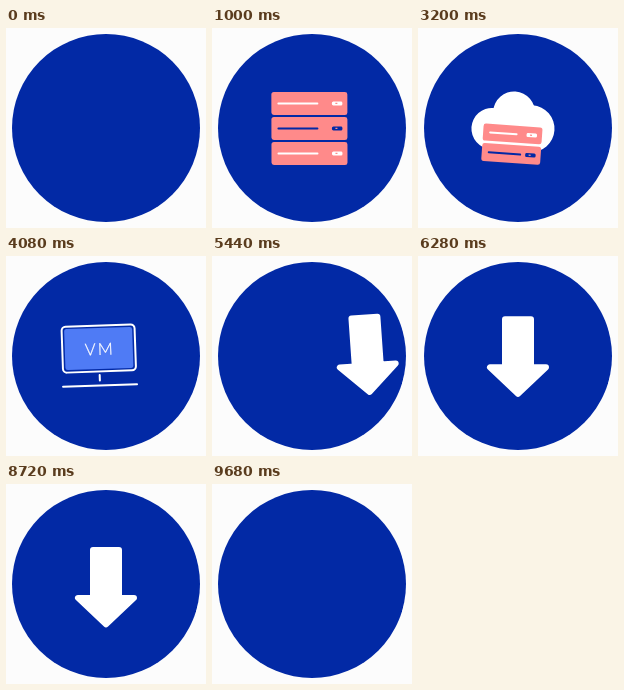
An HTML page for the animation above (10 s loop, 200 px wide and 200 px high).

```html
<!DOCTYPE html>
<html lang="en">
<head>
<meta charset="utf-8">
<title>Cloud icons</title>
<style>
  html, body { margin: 0; width: 100%; height: 100%; overflow: hidden; background: #fcfcfc; }
  svg { display: block; width: 100vw; height: 100vh; }
  .line { fill: none; stroke: #fff; stroke-width: 2; stroke-linecap: round; stroke-linejoin: round; }
  .label { font: 300 16.5px Lato, "Open Sans", sans-serif; fill: #fff; stroke: #fff; stroke-width: .3; }
</style>
</head>
<body>
<svg viewBox="0 0 200 200">
  <defs>
    <clipPath id="disc"><circle cx="98" cy="100" r="92"/></clipPath>
  </defs>
  <circle cx="100" cy="100" r="94" fill="#0229a5"/>
  <g clip-path="url(#disc)">
    <g class="item" id="rack"></g>
    <g class="item" id="cloud">
      <g fill="#fff">
        <circle cx="-21" cy="2" r="20.5"/>
        <circle cx="0" cy="-15.5" r="21"/>
        <circle cx="18" cy="-.5" r="23.5"/>
        <rect x="-21" y="0" width="40" height="22.8"/>
      </g>
    </g>
    <g class="item" id="screen">
      <rect class="line" x="-36.5" y="-30" width="73" height="46" rx="4"/>
      <rect x="-34" y="-27.5" width="68" height="41" rx="2.5" fill="#4f7bf5"/>
      <text class="label" x="-14" y="-.5">V</text>
      <text class="label" x="-1" y="-.5">M</text>
      <path class="line" d="M0 19.5V25M-37 30H37"/>
    </g>
    <g class="item" id="arrow">
      <path d="M-13 -37H13V11H28L0 37.5L-28 11H-13Z" fill="#fff" stroke="#fff"
            stroke-width="6" stroke-linejoin="round"/>
    </g>
  </g>
</svg>
<script>
const LOOP = 10000;
const NAVY = '#0229a5', WHITE = '#fff', SALMON = '#ff8a8a';
const NS = 'http://www.w3.org/2000/svg';
const $ = id => document.getElementById(id);

function add(parent, tag, attrs) {
  const el = document.createElementNS(NS, tag);
  for (const key in attrs) el.setAttribute(key, attrs[key]);
  parent.appendChild(el);
}

function addServer(parent, y, w, h, ink, reach) {
  const mid = y + h / 2, left = -w / 2;
  add(parent, 'rect', { x: left, y, width: w, height: h, rx: 2.5, fill: SALMON });
  add(parent, 'path', {
    d: `M${left + 7} ${mid}H${reach}`,
    stroke: ink, 'stroke-width': 2, 'stroke-linecap': 'round'
  });
  add(parent, 'rect', { x: -left - 15.5, y: mid - 2, width: 10.5, height: 4, rx: 1.5, fill: ink });
  add(parent, 'rect', { x: -left - 12, y: mid - .6, width: 2, height: 1.2, fill: SALMON });
}

addServer($('cloud'), -2.5, 59, 17, WHITE, 4);
addServer($('cloud'), 17, 59, 18, NAVY, 9);
for (const [y, ink] of [[-36, WHITE], [-11, NAVY], [14, WHITE]])
  addServer($('rack'), y, 76, 23, ink, 8);

// Rows: time, x, y, turn
const ENTER = [
  [0, 140, -2, -5], [240, 55, -1.5, -4], [420, 12, -1, -3.2],
  [600, -7, -.5, -2], [760, -13, 0, -1], [1040, 0, 0, 0]
];
const LEAVE = [
  [0, 0, 0, 0], [300, 0, 0, 3.2], [360, -5, 0, 4],
  [520, -60, 0, 5], [680, -145, 0, 6]
];
// Rows: time, y
const BOB = [
  [6240, 0], [6800, 3], [7360, 0], [7720, 0], [8280, 0], [8680, 3], [9080, 0]
];

const ITEMS = [
  { el: $('rack'), start: 40, leave: 1120 },
  { el: $('cloud'), start: 1760, leave: 2840 },
  { el: $('screen'), start: 3480, leave: 4560 },
  { el: $('arrow'), start: 5200, leave: 8980, bob: BOB }
];

// Smooth curve through the rows, at rest outside them and at turning points
function sample(rows, t, col) {
  const last = rows.length - 1;
  if (t <= rows[0][0]) return rows[0][col];
  if (t >= rows[last][0]) return rows[last][col];
  let i = 0;
  while (t >= rows[i + 1][0]) i++;
  const slope = k => (rows[k + 1][col] - rows[k][col]) / (rows[k + 1][0] - rows[k][0]);
  const tangent = k => {
    if (k === 0) return slope(0);
    if (k === last) return 0;
    const a = slope(k - 1), b = slope(k);
    return a * b <= 0 ? 0 : 2 * a * b / (a + b);
  };
  const [t0, t1] = [rows[i][0], rows[i + 1][0]];
  const span = t1 - t0, u = (t - t0) / span, v = 1 - u;
  return rows[i][col] * v * v * (1 + 2 * u) + rows[i + 1][col] * u * u * (3 - 2 * u)
    + span * u * v * (v * tangent(i) - u * tangent(i + 1));
}

function draw(now) {
  const t = now % LOOP;
  for (const { el, start, leave, bob } of ITEMS) {
    const shown = t >= start && t < leave + 680;
    el.style.display = shown ? '' : 'none';
    if (!shown) continue;
    const rows = t < leave ? ENTER : LEAVE;
    const [x, y, turn] = [1, 2, 3].map(c => sample(rows, t - (t < leave ? start : leave), c));
    const lift = bob ? sample(bob, t, 1) : 0;
    el.setAttribute('transform', `translate(${100 + x} ${100 + y + lift}) rotate(${turn})`);
  }
}

let origin = null;
function tick(now) {
  if (origin === null) origin = now;
  draw(now - origin);
  requestAnimationFrame(tick);
}
draw(0);
requestAnimationFrame(tick);
</script>
</body>
</html>
```
